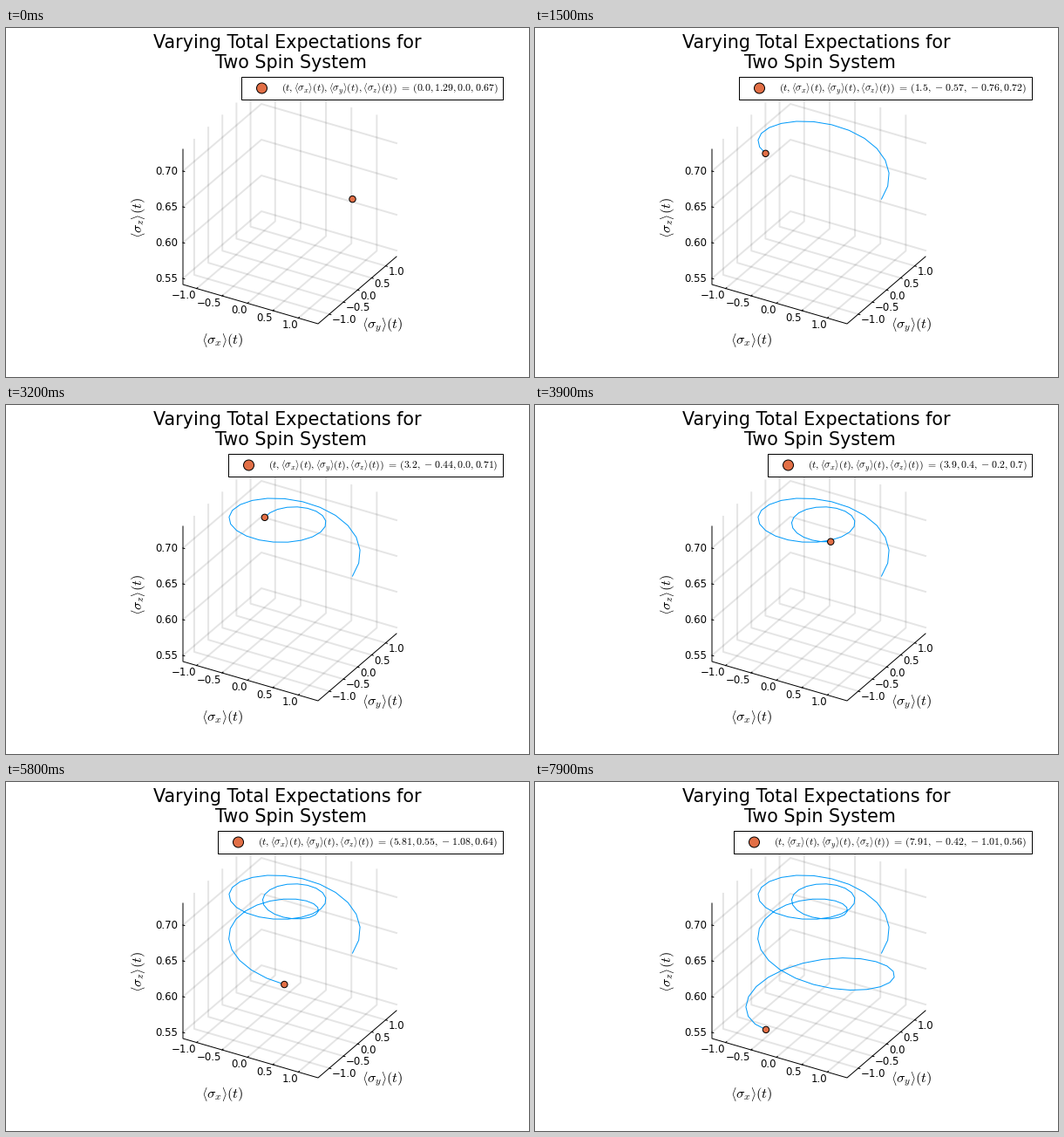
A matplotlib script that plays this animation: 600 px wide and 400 px high, repeating every 8 s.

```python
import numpy as np
import matplotlib.pyplot as plt
from matplotlib.animation import FuncAnimation
from matplotlib.patches import Circle, Rectangle

FRAMES, STEP = 80, 0.1001
PX = 0.72  # points per pixel at 100 dpi
SMALL, MEDIUM, LARGE = 11.8, 16.2, 20.64
BLUE, ORANGE = "#009afa", "#e26f46"

plt.rcParams["font.family"] = "DejaVu Sans"
plt.rcParams["mathtext.fontset"] = "cm"

# Oblique projection of the data box
LOW = np.array([-1.271, -1.4, 0.5415])
HIGH = np.array([1.388, 1.386, 0.7305])
AXES = np.array([[155, 45], [90, -77], [0, -155]])
ORIGIN = np.array([203, 294])


def project(points):
    return ORIGIN + (np.asarray(points) - LOW) / (HIGH - LOW) @ AXES


def spin_path(t):
    """Two precessing spins that drift in and out of phase."""
    lag = 0.14 * t * np.exp(-(t / 1.6) ** 2)
    delta = 0.424 + 0.9076 * t - 0.541 * np.sin(0.483 * t - 0.58)
    xy = np.exp(1j * (2.957 * t - lag)) * (0.8875 + 0.4825 * np.exp(-1j * delta))
    xy *= abs(xy[0]) / xy[0]
    z = np.polyval(np.polyfit(
        [0, 0.5, 1.5, 3.2, 4.6, 5.8, 6.9, 7.9],
        [0.667, 0.691, 0.719, 0.711, 0.6906, 0.642, 0.584, 0.558], 6), t)
    return np.column_stack([xy.real, xy.imag, z])


spins = spin_path(np.arange(FRAMES) / 10)
path = project(spins)

fig = plt.figure(figsize=(6, 4), dpi=100, facecolor="white")
ax = fig.add_axes([0, 0, 1, 1])
ax.set_xlim(0, 600)
ax.set_ylim(400, 0)
ax.axis("off")


def stroke(points, width=1, **style):
    return ax.plot(*np.asarray(points).T, lw=width * PX, **style)[0]


def label(x, y, text, size=SMALL, ha="center", va="baseline", **style):
    return ax.text(x, y, text, fontsize=size * PX, ha=ha, va=va, **style)


def disc(center, radius, zorder):
    return ax.add_patch(Circle(center, radius, fc=ORANGE, ec="black", lw=PX,
                               zorder=zorder))


def grid(*points):
    stroke(project(points), 2, color="black", alpha=0.1, zorder=1)


def tick(point, axis):
    end = np.array(point, float)
    end[axis] += 0.012 * (HIGH - LOW)[axis]
    stroke(project([point, end]), color="black", zorder=2)
    return project(point)


(x0, y0, z0), (x1, y1, z1) = LOW, HIGH
for v in np.arange(-1, 1.5, 0.5):
    name = f"{v:.1f}".replace("-", "\u2212")
    grid((v, y0, z0), (v, y1, z0), (v, y1, z1))
    grid((x1, v, z0), (x0, v, z0), (x0, v, z1))
    px, py = tick((v, y0, z0), 1)
    label(px - 0.5, py + 11.8, name, ha="right")
    px, py = tick((x1, v, z0), 0)
    label(px + 3, py + 10.3, name, ha="left")
for v in np.arange(0.55, 0.72, 0.05):
    grid((x0, y0, v), (x0, y1, v), (x1, y1, v))
    px, py = tick((x0, y0, v), 0)
    label(px - 5.5, py + 4.3, f"{v:.2f}", ha="right")
stroke(project([(x0, y0, z1), LOW, (x1, y0, z0), (x1, y1, z0)]),
       color="black", zorder=2)

label(322.5, 23, "Varying Total Expectations for", LARGE)
label(326.5, 45.5, "Two Spin System", LARGE)

# Letters h and i of the calligraphic font are text-size angle brackets
MEAN_X, MEAN_Y, MEAN_Z = (
    rf"\mathcal{{h}}\sigma_{c}\mathcal{{i}}(t)" for c in "xyz")
label(248, 358, f"${MEAN_X}$", MEDIUM, va="center")
label(431.5, 341, f"${MEAN_Y}$", MEDIUM, va="center")
label(152.5, 218, f"${MEAN_Z}$", MEDIUM, va="center", rotation=90)

trail = stroke([path[0]], color=BLUE, zorder=3)
dot = disc(path[0], 3.7, 4)
box = ax.add_patch(Rectangle((270, 56), 300, 26, fc="white", ec="black",
                             lw=PX, zorder=5))
key = disc((293, 69), 6, 6)
legend = label(564.5, 72.5, "", ha="right", zorder=6)


def number(v):
    text = str(round(float(v), 2) + 0.0)
    return text.replace("-", r"\;{-}\;")


def update(i):
    trail.set_data(*path[:i + 1].T)
    dot.center = path[i]
    values = ",".join(map(number, (i * STEP, *spins[i])))
    legend.set_text(rf"$(t,{MEAN_X},{MEAN_Y},{MEAN_Z})\ =\,({values})$")
    left = round(legend.get_window_extent(fig.canvas.get_renderer()).x0 - 46)
    box.set_x(left)
    box.set_width(570 - left)
    key.center = (left + 23.5, 69)
    return trail, dot, box, key, legend


anim = FuncAnimation(fig, update, frames=FRAMES, interval=100, repeat=True,
                     repeat_delay=0)
plt.show()
```
